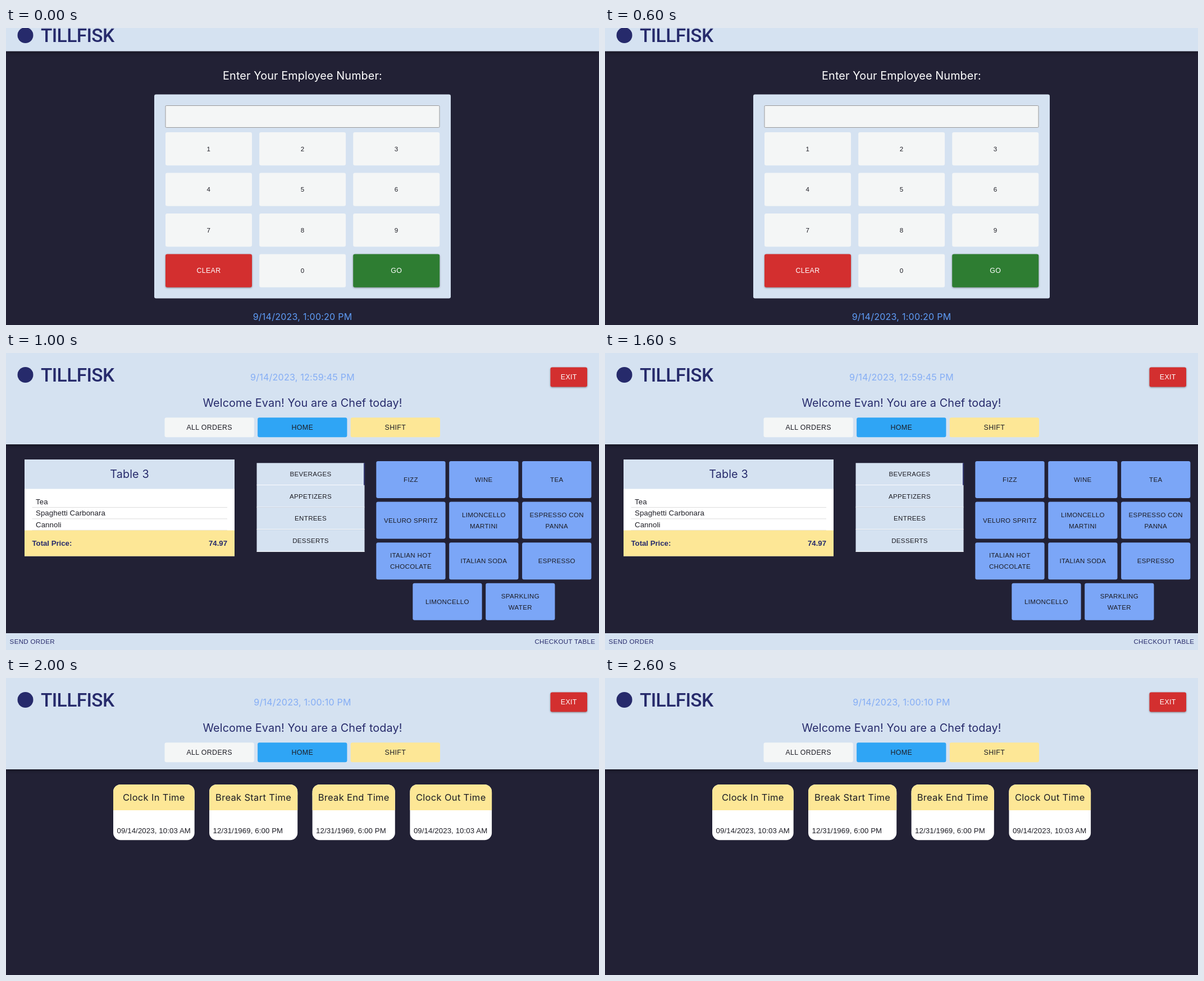
Recreate the animation shown at these times as an HTML page. Size 1056x530 px, loop 3000 ms.

```html
<!DOCTYPE html>
<html lang="en">
<head>
<meta charset="utf-8">
<title>Restaurant ordering screens</title>
<style>
  html, body { margin: 0; width: 100%; height: 100%; overflow: hidden; background: #222135; }
  #strip { display: block; animation: screens 3s steps(3) infinite; }
  @keyframes screens { to { transform: translateX(-3168px); } }
  text { white-space: pre; }
  .title { font: 19.8px Inter, sans-serif; letter-spacing: .12px; }
  .sub { font: 16.5px Inter, sans-serif; letter-spacing: .32px; }
  .clock { font: 16px Inter, sans-serif; letter-spacing: .25px; }
  .brand { font: 500 33.5px Roboto, sans-serif; letter-spacing: -.6px; }
  .small { font: 11.55px "Liberation Sans", Arial, sans-serif; letter-spacing: .33px; }
  .large { font: 12.4px "Liberation Sans", Arial, sans-serif; letter-spacing: .35px; }
  .body { font: 13.2px "Liberation Sans", Arial, sans-serif; letter-spacing: .12px; }
  .bold { font: bold 13.2px "Liberation Sans", Arial, sans-serif; }
  .bar { filter: drop-shadow(0 2px 3px rgba(0, 0, 0, .4)); }
  .raised { filter: drop-shadow(0 1.5px 1.5px rgba(0, 0, 0, .4)); }
</style>
</head>
<body>
<svg id="strip" width="3168" height="530"></svg>
<script>
const PALE = '#d5e2f1', NAVY = '#262a6b', DARK = '#222135', INK = '#1c1c24';
const LIGHT = '#f4f6f6', YELLOW = '#fde796', RED = '#d32f2f', GREEN = '#2e7d32';
const SKY = '#2fa5f5', BLUE = '#7ba6f7';

const rect = (x, y, w, h, fill, r = 0, cls = '') =>
  `<rect x="${x}" y="${y}" width="${w}" height="${h}" rx="${r}" fill="${fill}" class="${cls}"/>`;

const text = (str, x, y, cls, fill = INK, anchor = 'middle') =>
  `<text x="${x}" y="${y}" class="${cls}" fill="${fill}" text-anchor="${anchor}">${str}</text>`;

// A rounded button with one or two centred lines of text
function button(label, x, y, w, h, fill, { cls = 'small', ink = INK, shadow = '' } = {}) {
  const lines = label.split('|');
  const first = y + h / 2 + 4.2 - (lines.length - 1) * 10;
  return rect(x, y, w, h, fill, 3.3, shadow) +
    lines.map((line, i) => text(line, x + w / 2, first + i * 20, cls, ink)).join('');
}

const logo = y =>
  `<circle cx="34.5" cy="${y}" r="14" fill="${NAVY}"/>` +
  text('TILLFISK', 62, y + 11.5, 'brand', NAVY, 'start');

function loginScreen() {
  const raised = { cls: 'large', ink: '#fff', shadow: 'raised' };
  const keys = ['1', '2', '3', '4', '5', '6', '7', '8', '9', 'CLEAR', '0', 'GO'];
  const fills = { CLEAR: RED, GO: GREEN };
  return rect(0, 0, 1056, 41.5, PALE, 0, 'bar') + logo(13) +
    text('Enter Your Employee Number:', 528, 92, 'title', '#fff') +
    rect(264, 118.5, 528, 364, PALE, 3.3) +
    '<rect x="284" y="138.5" width="488" height="39" rx="1.5" fill="#f4f6f6" stroke="#999"/>' +
    keys.map((key, i) => button(key, 284 + i % 3 * 167.1, 186 + Math.floor(i / 3) * 72.5,
      154, 59.3, fills[key] || LIGHT, fills[key] ? raised : {})).join('') +
    text('9/14/2023, 1:00:20 PM', 528, 521, 'clock', '#5f9df7');
}

function header(time) {
  const nav = [['ALL ORDERS', LIGHT], ['HOME', SKY], ['SHIFT', YELLOW]];
  return rect(0, 0, 1056, 163, PALE, 0, 'bar') + logo(39) +
    text(time, 528, 48.5, 'clock', '#84adf5') +
    text('Welcome Evan! You are a Chef today!', 528, 96, 'title', NAVY) +
    button('EXIT', 969.5, 25.5, 65.5, 35, RED, { cls: 'large', ink: '#fff', shadow: 'raised' }) +
    nav.map(([label, fill], i) =>
      button(label, 282.5 + i * 165.6, 115.3, 159.3, 35, fill, { cls: 'large' })).join('');
}

function orderScreen() {
  const dishes = ['Tea', 'Spaghetti Carbonara', 'Cannoli'];
  const tabs = ['BEVERAGES', 'APPETIZERS', 'ENTREES', 'DESSERTS'];
  const drinks = ['FIZZ', 'WINE', 'TEA', 'VELURO SPRITZ', 'LIMONCELLO|MARTINI', 'ESPRESSO CON|PANNA',
    'ITALIAN HOT|CHOCOLATE', 'ITALIAN SODA', 'ESPRESSO', 'LIMONCELLO', 'SPARKLING|WATER'];
  return header('9/14/2023, 12:59:45 PM') +
    rect(33, 190, 374, 172.5, '#fff') +
    rect(33, 190, 374, 52.5, PALE) +
    text('Table 3', 220, 223, 'title', NAVY) +
    dishes.map((dish, i) => text(dish, 53, 270 + i * 20.4, 'body', INK, 'start') +
      rect(46.5, 275 + i * 20.4, 347.5, 1, '#dcdcdc')).join('') +
    rect(33, 316.5, 374, 46, YELLOW) +
    text('Total Price:', 46.5, 344, 'bold', NAVY, 'start') +
    text('74.97', 394, 344, 'bold', NAVY, 'end') +
    tabs.map((tab, i) => rect(446.5, 196.3 + i * 39.6, 192, 39.6, PALE) +
      rect(446.5, 235 + i * 39.6, 192, 1, '#fff') +
      text(tab, 542.5, 220.2 + i * 39.6, 'small')).join('') +
    rect(637, 196.3, 1.7, 39.6, NAVY) +
    drinks.map((drink, i) => button(drink, 659.3 + i % 3 * 129.9 + (i > 8 ? 65 : 0),
      193 + Math.floor(i / 3) * 72.6, 123.3, 66, BLUE)).join('') +
    rect(0, 500, 1056, 30, PALE) +
    text('SEND ORDER', 6.6, 519.2, 'small', NAVY, 'start') +
    text('CHECKOUT TABLE', 1049.4, 519.2, 'small', NAVY, 'end');
}

function shiftScreen() {
  const worked = '09/14/2023, 10:03 AM', unset = '12/31/1969, 6:00 PM';
  const cards = [
    ['Clock In Time', worked, 191, 144.7],
    ['Break Start Time', unset, 362, 157.2],
    ['Break End Time', unset, 545.6, 147.2],
    ['Clock Out Time', worked, 719.4, 145.7]
  ];
  return header('9/14/2023, 1:00:10 PM') +
    cards.map(([title, time, x, w]) => rect(x, 190, w, 99.3, '#fff', 13) +
      rect(x, 190, w, 30, YELLOW, 13) + rect(x, 206, w, 30, YELLOW) +
      text(title, x + w / 2, 218.5, 'sub') +
      text(time, x + 6.5, 276.8, 'body', INK, 'start')).join('');
}

document.getElementById('strip').innerHTML = [loginScreen, orderScreen, shiftScreen]
  .map((draw, i) => `<svg x="${i * 1056}" width="1056" height="530">` +
    rect(0, 0, 1056, 530, DARK) + draw() + '</svg>').join('');
</script>
</body>
</html>
```
